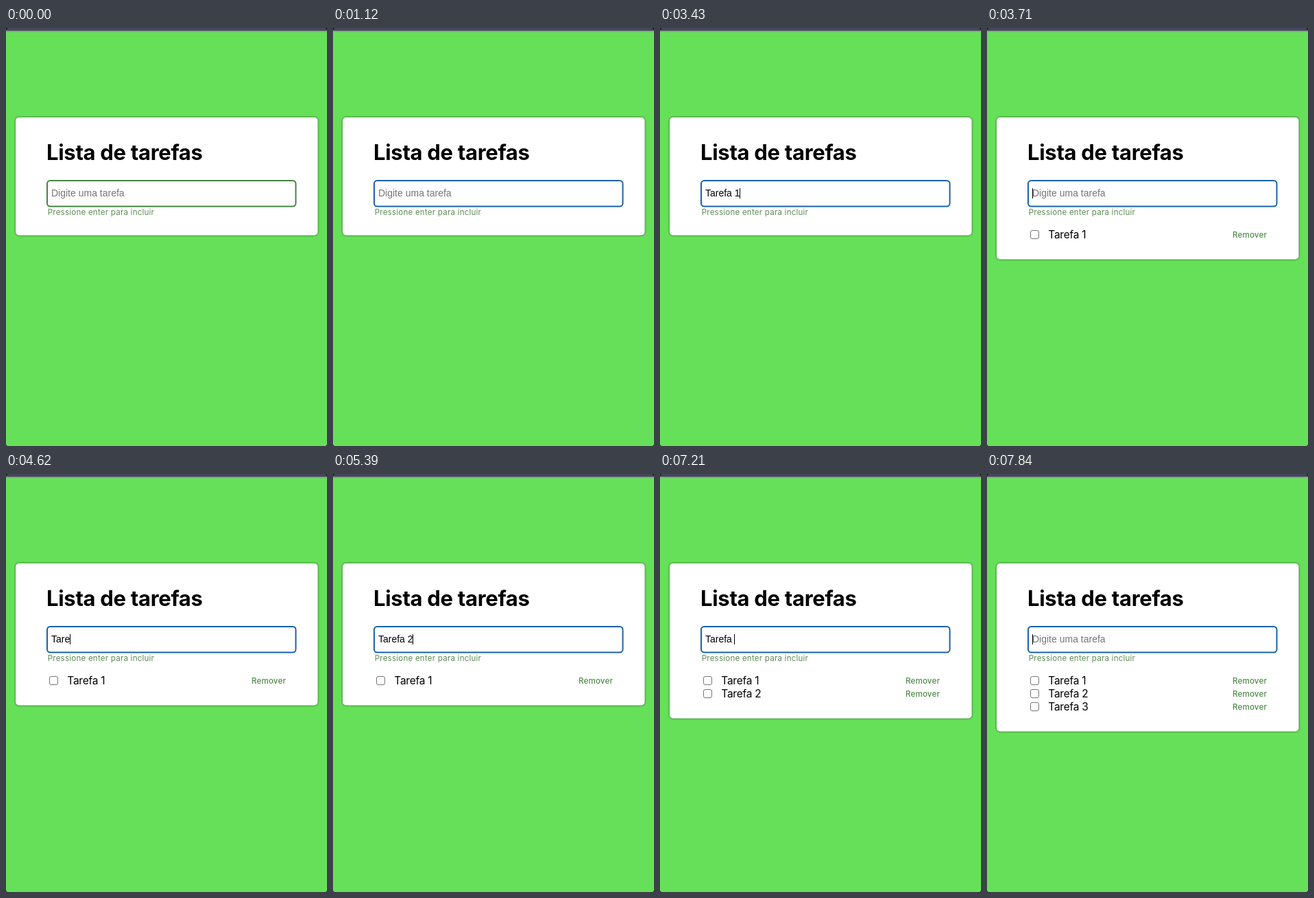
An HTML page for the animation above (8 s loop, 468 by 608 pixels).

```html
<!DOCTYPE html>
<html lang="pt-BR">
<head>
<meta charset="utf-8">
<title>Lista de tarefas</title>
<style>
  html, body { margin: 0; width: 100%; height: 100%; overflow: hidden; background: #67e059; }
  svg { display: block; width: 468px; height: 608px; font-family: Inter, sans-serif; }
  #card { fill: #fff; filter: drop-shadow(0 0 1.6px rgba(0, 0, 0, .65)); }
  .title { font-size: 31px; font-weight: 700; letter-spacing: -.3px; }
  #field { fill: #fff; stroke-width: 2; stroke: #458642; }
  #field.focus { stroke: #1a62aa; }
  #value { font: 14px "Liberation Sans", Arial, sans-serif; }
  #value.empty { fill: #757575; }
  .hint { font-size: 11.6px; letter-spacing: .2px; fill: #5c8d55; }
  .task { font-size: 15.5px; letter-spacing: -.25px; }
  .remove { font-size: 11.6px; font-weight: 550; letter-spacing: .15px; fill: #4f8b49; }
  .box { fill: #fff; stroke: #767676; }
</style>
</head>
<body>
<svg viewBox="0 0 468 608">
  <rect width="468" height="608" fill="#67e059"/>
  <rect width="468" height="4" fill="#48475c"/>
  <rect y="4" width="468" height="2" fill="#8c9f9c"/>
  <path d="M0 0h3L0 3zM468 0h-3l3 3zM0 608h2l-2-2zM468 608h-2l2-2z" fill="#222"/>
  <rect id="card" x="14" y="130" width="440.5" height="171.5" rx="5"/>
  <text class="title" x="59" y="192">Lista de tarefas</text>
  <rect id="field" x="60" y="222" width="362.5" height="37.5" rx="4.5"/>
  <text id="value" x="66" y="245"></text>
  <rect id="caret" y="233" width="1" height="15"/>
  <text class="hint" x="60.7" y="272">Pressione enter para incluir</text>
  <g id="rows"></g>
</svg>
<script>
  const LOOP = 8000, FOCUS = 630;
  const tasks = [
    { keys: [2240, 2310, 2450, 2590, 2870, 2940, 3290, 3430], enter: 3710 },
    { keys: [4200, 4340, 4480, 4620, 4830, 4970, 5250, 5390], enter: 5600 },
    { keys: [6300, 6440, 6510, 6650, 6860, 6930, 7210, 7560], enter: 7840 }
  ].map((task, i) => ({ ...task, name: `Tarefa\u00a0${i + 1}` }));
  const caretOff = [[0, FOCUS], [1120, 1680], [3920, 4200], [5880, 6300]];

  const $ = id => document.getElementById(id);
  const card = $('card'), field = $('field'), value = $('value'), caret = $('caret'), rows = $('rows');

  rows.innerHTML = tasks.map(({ name }, i) => `
    <g transform="translate(0 ${i * 19})">
      <rect class="box" x="63.5" y="294.5" width="12" height="12" rx="2.5"/>
      <text class="task" x="89.3" y="306">${name}</text>
      <text class="remove" x="358" y="305">Remover</text>
    </g>`).join('');

  function render(t) {
    const done = tasks.filter(task => t >= task.enter).length;
    const current = tasks[done];
    const typed = current ? current.name.slice(0, current.keys.filter(k => t >= k).length) : '';

    card.setAttribute('height', done ? 187.5 + 19 * done : 171.5);
    [...rows.children].forEach((row, i) => row.style.display = i < done ? '' : 'none');
    field.classList.toggle('focus', t >= FOCUS);

    value.textContent = typed || 'Digite uma tarefa';
    value.classList.toggle('empty', !typed);
    const width = typed ? value.getComputedTextLength() : 0;
    caret.setAttribute('x', Math.floor(66 + width));
    const hidden = caretOff.some(([from, to]) => t >= from && t < to);
    caret.style.display = hidden ? 'none' : '';
  }

  const start = performance.now();
  function tick() {
    render((performance.now() - start) % LOOP);
    requestAnimationFrame(tick);
  }
  tick();
</script>
</body>
</html>
```
